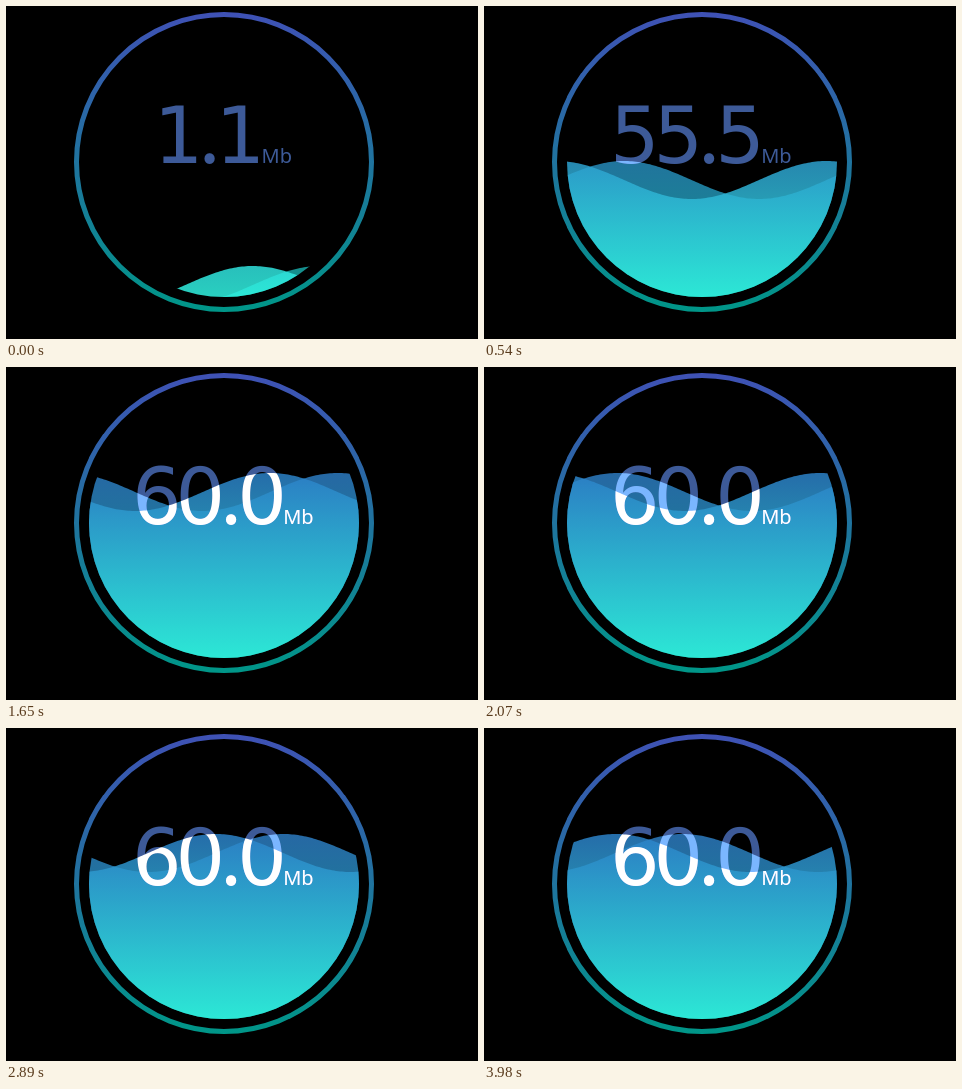
Write an HTML page that moves like this. It is 472x333 px and loops after 4.08 s.

```html
<!DOCTYPE html>
<html lang="en">
<head>
<meta charset="utf-8">
<title>Download gauge</title>
<style>
html, body { margin: 0; width: 100%; height: 100%; overflow: hidden; background: #000; }
svg { display: block; width: 472px; height: 333px; }
.num { font: 400 78px "DejaVu Sans", sans-serif; letter-spacing: -6.3px; }
.dot { font: 400 78px "Noto Sans CJK SC", "Noto Sans CJK JP", "Noto Sans", sans-serif; }
.unit { font: 400 20px "Noto Sans", "Open Sans", sans-serif; }
</style>
</head>
<body>
<svg viewBox="0 0 472 333" xmlns="http://www.w3.org/2000/svg">
  <defs>
    <linearGradient id="rim" gradientUnits="userSpaceOnUse" x1="0" y1="6" x2="0" y2="306">
      <stop offset="0" stop-color="#3f51b5"/>
      <stop offset="1" stop-color="#009688"/>
    </linearGradient>
    <linearGradient id="near" gradientUnits="userSpaceOnUse" x1="0" y1="106" x2="0" y2="291">
      <stop offset="0" stop-color="rgb(44,130,202)"/>
      <stop offset="1" stop-color="rgb(49,247,228)"/>
    </linearGradient>
    <linearGradient id="far" gradientUnits="userSpaceOnUse" x1="0" y1="106" x2="0" y2="291">
      <stop offset="0" stop-color="rgb(38,104,164)"/>
      <stop offset="1" stop-color="rgb(18,150,138)"/>
    </linearGradient>
    <clipPath id="bowl"><circle cx="218" cy="156" r="135"/></clipPath>
    <clipPath id="inBack"><path class="back"/></clipPath>
    <clipPath id="inFront"><path class="front"/></clipPath>
  </defs>
  <rect width="472" height="333"/>
  <circle cx="218" cy="156" r="147.5" fill="none" stroke="url(#rim)" stroke-width="5"/>
  <g clip-path="url(#bowl)">
    <path class="back" fill="url(#far)"/>
    <path class="front" fill="url(#near)" opacity=".84"/>
  </g>
  <g fill="#3d5a98">
    <g id="label">
      <text class="num" id="whole" y="157"></text>
      <text class="dot" id="dot" y="157" text-anchor="middle">.</text>
      <text class="num" id="tenth" y="157"></text>
      <text class="unit" id="unit" y="157">Mb</text>
    </g>
  </g>
  <g clip-path="url(#inBack)"><use href="#label" fill="#7ab6ff"/></g>
  <g clip-path="url(#inFront)"><use href="#label" fill="#fff"/></g>
</svg>
<script>
const LOOP = 4080, TICK = 135, COUNT = 30;
const LENGTH = 270, AMP = 19;
const DIGIT = 43.3, DOT = 18.5, UNIT = 29, BEARING = 3.2;

const $ = id => document.getElementById(id);

function wave(crest, y) {
  let d = "M80 300";
  for (let x = 80; x <= 356; x += 2) {
    d += `L${x} ${(y - AMP * Math.cos((x - crest) / LENGTH * 2 * Math.PI)).toFixed(2)}`;
  }
  return d + "L356 300Z";
}

function setWave(name, d) {
  document.querySelectorAll("path." + name).forEach(p => p.setAttribute("d", d));
}

// Centres number and unit together in the ring
function setLabel(value) {
  const [whole, tenth] = value.toFixed(1).split(".");
  const w = whole.length * DIGIT;
  const x = 218 - (w + DOT + DIGIT + UNIT) / 2;
  $("whole").textContent = whole;
  $("tenth").textContent = tenth;
  $("whole").setAttribute("x", x - BEARING);
  $("dot").setAttribute("x", x + w + DOT / 2);
  $("tenth").setAttribute("x", x + w + DOT - BEARING);
  $("unit").setAttribute("x", x + w + DOT + DIGIT - 0.5);
}

function draw(step) {
  const mid = 10.5 + 23.95 * step;
  const level = Math.max(125, 279 - 26.25 * step);
  setWave("front", wave(mid - LENGTH / 8, level));
  setWave("back", wave(mid + LENGTH / 8, level));
  setLabel(Math.min(60, 1.1 + 13.6 * step));
}

let shown = -1;
const start = performance.now();
function tick() {
  const t = (performance.now() - start) % LOOP;
  const step = Math.min(COUNT - 1, Math.floor(t / TICK));
  if (step !== shown) draw(shown = step);
  requestAnimationFrame(tick);
}
tick();
</script>
</body>
</html>
```
